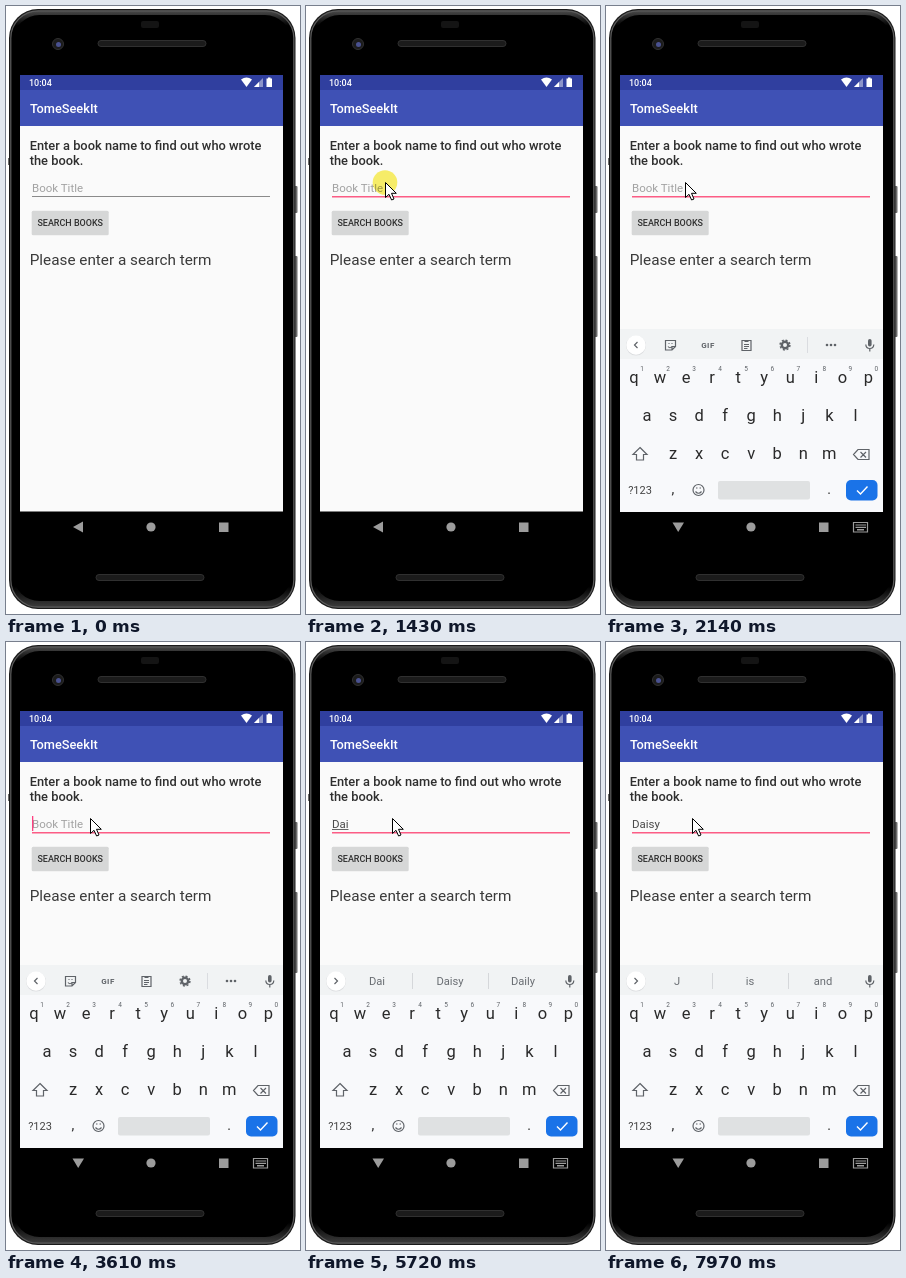
An HTML page for the animation above (8000 ms loop, 294 by 608 pixels).

```html
<!DOCTYPE html>
<html lang="en">
<head>
<meta charset="utf-8">
<title>Book search</title>
<style>
html, body { margin: 0; width: 100%; height: 100%; overflow: hidden; background: #fff; }
svg { display: block; width: 100%; height: 100%; font-family: Roboto, sans-serif; }
.m { text-anchor: middle; }
.med { font-weight: 500; }
.line { fill: none; stroke: #5f6368; stroke-width: 1.2; }
#halo { mix-blend-mode: multiply; }
</style>
</head>
<body>
<svg viewBox="0 0 294 608">
  <defs>
    <linearGradient id="sheen" x2="0" y2="1">
      <stop stop-color="#4a4a4a"/><stop offset=".025"/>
      <stop offset=".965"/><stop offset="1" stop-color="#3c3c3c"/>
    </linearGradient>
  </defs>

  <!-- phone -->
  <g fill="#6b6b6b">
    <rect x="288" y="180" width="3.500" height="27" rx="1"/>
    <rect x="288" y="250" width="3.500" height="81" rx="1"/>
    <rect x="2" y="152" width="3" height="7"/>
  </g>
  <rect x="3" y="3" width="286.500" height="600" rx="29" fill="#1a1a1a"/>
  <rect x="4.800" y="4.800" width="283" height="596.400" rx="27.500" fill="url(#sheen)" stroke="#5c5c5c" stroke-width="1.200"/>
  <rect x="7.500" y="9" width="277.500" height="586" rx="26"/>
  <g fill="#1b1b1b" stroke="#303030">
    <rect x="92" y="34.500" width="108" height="6" rx="3"/>
    <rect x="90" y="568.500" width="108" height="6" rx="3"/>
    <circle cx="52" cy="38" r="5.500"/>
  </g>
  <rect x="135" y="15" width="18" height="7" rx="2" fill="#141414"/>
  <circle cx="52.500" cy="38.500" r="2.500" fill="#4a5290"/>

  <!-- app -->
  <rect x="14" y="69" width="263" height="436.500" fill="#fafafa"/>
  <rect x="14" y="69" width="263" height="15" fill="#303f9f"/>
  <rect x="14" y="84" width="263" height="36" fill="#3f51b5"/>
  <g fill="#fff" class="med">
    <text x="23" y="80" font-size="9">10:04</text>
    <text x="24" y="106.500" font-size="12.8">TomeSeekIt</text>
    <path d="M235 73.500Q240.500 69.500 246 73.500L240.500 81Z"/>
    <path d="M257 72V81H248Z" opacity=".45"/>
    <path d="M253 76V81H248Z"/>
    <path d="M260.500 72.500H262V71.500H264.500V72.500H266V81H260.500Z"/>
  </g>
  <g fill="#2e2e2e">
    <g class="med" font-size="12.85">
      <text x="23.700" y="143.500">Enter a book name to find out who wrote</text>
      <text x="23.700" y="158.500">the book.</text>
    </g>
    <rect x="25.700" y="204.800" width="77" height="24.400" rx="1.500" fill="#d6d7d7"/>
    <text class="m med" x="64.200" y="220" font-size="8.96">SEARCH BOOKS</text>
    <text x="23.700" y="258.500" font-size="15.3" fill="#3a3a3a">Please enter a search term</text>
  </g>
  <text id="field" x="26" y="186" font-size="11.5"></text>
  <rect id="composing" x="26" y="187" height="1" fill="#666"/>
  <rect id="rule" x="26" y="190" width="238"/>
  <rect id="caret" y="174" width="1.300" height="15" fill="#ff4081"/>

  <!-- keyboard -->
  <g id="kb">
    <rect x="14" y="323" width="263" height="183" fill="#f8f9fb"/>
    <rect x="14" y="323" width="263" height="30" fill="#f1f3f4"/>
    <circle cx="30" cy="339.600" r="10" fill="#dcdee0"/>
    <circle cx="30" cy="339" r="9.700" fill="#fff"/>
    <path id="chevron" class="line"/>
    <g id="tools">
      <g class="line">
        <path d="M59.500 334.500H69.500V340.500L66 344H59.500ZM66 344V340.500H69.500M62 340.500Q64 343 66 340.500M62.500 337.500H63.500M65.500 337.500H66.500"/>
        <path d="M136 334.500H145V344.500H136ZM138.500 335.500H142.500M138 338.500H143M138 340.500H143M138 342.500H141.500"/>
        <circle cx="179" cy="339" r="3.200" stroke-width="2.400"/>
        <circle cx="179" cy="339" r="4.900" stroke-width="1.500" stroke-dasharray="2 1.850"/>
      </g>
      <text class="m" x="102" y="342" font-size="8" font-weight="700" fill="#5f6368" letter-spacing=".5">GIF</text>
      <path d="M201.500 331V347" stroke="#dadce0"/>
      <g fill="#5f6368"><circle cx="221" cy="339" r="1.300"/><circle cx="225" cy="339" r="1.300"/><circle cx="229" cy="339" r="1.300"/></g>
    </g>
    <g id="words" class="m" font-size="11.2" fill="#6a6e73">
      <path d="M106.500 331V347M182.500 331V347" stroke="#d5d7da"/>
      <text x="71" y="343"></text><text x="144" y="343"></text><text x="217" y="343"></text>
    </g>
    <rect x="262" y="333" width="3.600" height="7.500" rx="1.800" fill="#5f6368"/>
    <path class="line" d="M259.800 338.500Q260 342.500 263.800 342.500T267.800 338.500M263.800 342.500V345.500"/>
    <g id="keys" class="m"></g>
    <g class="line">
      <path d="M34 441.500L41 448.500H37.500V454H30.500V448.500H27Z"/>
      <path d="M252 443.500H263V453.500H252L247.500 448.500ZM254.500 446L260 451.500M260 446L254.500 451.500"/>
      <circle cx="92.500" cy="484" r="5.500"/>
      <path d="M89.500 485.500Q92.500 489 95.500 485.500M90 482H91.500M93.500 482H95"/>
    </g>
    <rect x="112" y="475" width="92" height="18.500" rx="2" fill="#dfe1e2"/>
    <rect x="240" y="474" width="31.500" height="20.500" rx="5" fill="#1a73e8"/>
    <path d="M251 484.500L254.500 488L261.500 480.500" fill="none" stroke="#fff" stroke-width="1.400"/>
  </g>

  <!-- navigation bar -->
  <rect x="14" y="506" width="263" height="30" opacity=".15"/>
  <g fill="#9c9c9c">
    <path id="back"/>
    <circle cx="145" cy="521" r="4.600"/>
    <rect x="213" y="516.500" width="9.500" height="9.500"/>
    <g id="ime">
      <path fill="none" stroke="#9c9c9c" stroke-width="1.200" d="M247.500 516.500H261.500V526H247.500ZM249.500 519H260M249.500 521.300H260"/>
      <path d="M251 523H258V524.500H251Z"/>
    </g>
  </g>

  <circle id="halo" cx="79" cy="176.500" r="12.300" fill="#fbf16a"/>
  <path id="mouse" d="M.5 .5V15.500L4 12.300L6.600 18L9 17L6.500 11.300H11.300Z" fill="#fff" stroke="#000" stroke-linejoin="round"/>
</svg>
<script>
const $ = id => document.getElementById(id);
const show = (id, on) => $(id).style.display = on ? '' : 'none';
const set = (id, attrs) => { for (const k in attrs) $(id).setAttribute(k, attrs[k]); };

// last entry whose start time has passed
const at = (list, t) => list.filter(e => e[0] <= t).pop();

// key caps
const key = (s, x, y, size, fill = '#2a2a2a') =>
  `<text x="${x}" y="${y}" font-size="${size}" fill="${fill}">${s}</text>`;
const row = (s, x, y) => [...s].map((c, i) => key(c, x + 26.05 * i, y, 16.5)).join('');
$('keys').innerHTML = row('qwertyuiop', 28, 377) + row('asdfghjkl', 41, 415) + row('zxcvbnm', 67, 453)
  + [...'1234567890'].map((c, i) => key(c, 36 + 26.05 * i, 365, 6.5, '#5f6368')).join('')
  + key('?123', 34, 488, 11, '#444') + key(',', 67, 488, 14) + key('.', 223, 488, 14);

// [time, typed letters, caret x]
const typing = [[0, 0, 26], [3920, 1, 33.3], [4480, 2, 39.8], [5030, 3, 42.5],
  [5950, 4, 48.5], [6410, 5, 53.8], [7190, 6, 56.5]];
// [time, underline width, three suggestions]
const hints = [[0, 0, ''], [4090, 7.5, 'D Do Did'], [4710, 13.8, 'Da Day Dance'],
  [5260, 16.5, 'Dai Daisy Daily'], [6180, 22.5, 'Dais Daisy Dairy'],
  [6640, 28, 'Daisy Daisies Daily'], [7510, 0, 'J is and']];
// [time, caret visible]
const blink = [[0, 0], [1740, 1], [2140, 0], [2590, 1], [3080, 0], [3610, 1], [5720, 0], [5950, 1], [7970, 0]];
// [time, keyboard offset, opacity]
const slide = [[0, 60, 0], [1660, 48, .4], [1740, 16, .77], [1820, 4, .95], [1890, 0, 1]];
// [time, x, y]
const rest = [[1050, 87, 171], [1200, 79, 176], [2680, 83, 176], [3150, 84, 176], [4160, 85, 176], [4330, 86, 176]];

function mousePos(t) {
  if (t >= 1050) return at(rest, t).slice(1);
  const p = Math.floor((t - 440) / 76.25) / 8;
  const e = p * p * (3 - 2 * p);
  return [222 - 135 * e, 583 - 412 * e];
}

function draw(t) {
  const [, count, caretX] = at(typing, t);
  $('field').textContent = count ? 'Daisy '.slice(0, count) : 'Book Title';
  set('field', { fill: count ? '#4a4a4a' : '#a2a2a2' });
  set('rule', t >= 1430 ? { height: 1.5, fill: '#fc5c85' } : { height: 1, fill: '#8a8a8a' });
  set('caret', { x: caretX });
  show('caret', at(blink, t)[1]);

  const [, width, words] = at(hints, t);
  set('composing', { width });
  show('tools', !words);
  show('words', words);
  const list = words.split(' ');
  document.querySelectorAll('#words text').forEach((el, i) => el.textContent = list[i] || '');
  set('chevron', { d: words ? 'M28.500 336L31.500 339L28.500 342' : 'M31.500 336L28.500 339L31.500 342' });

  const [, dy, opacity] = at(slide, t);
  set('kb', { transform: `translate(0 ${dy})`, opacity });
  show('kb', opacity);
  show('ime', opacity);
  set('back', { d: opacity ? 'M66.500 516.500H78L72.200 526Z' : 'M77 515.500V526.500L67 521Z' });

  show('halo', t >= 1360 && t < 1590);
  show('mouse', t >= 440);
  if (t >= 440) set('mouse', { transform: `translate(${mousePos(t)})` });
}

const start = performance.now();
function tick() {
  draw((performance.now() - start) % 8000);
  requestAnimationFrame(tick);
}
tick();
</script>
</body>
</html>
```
